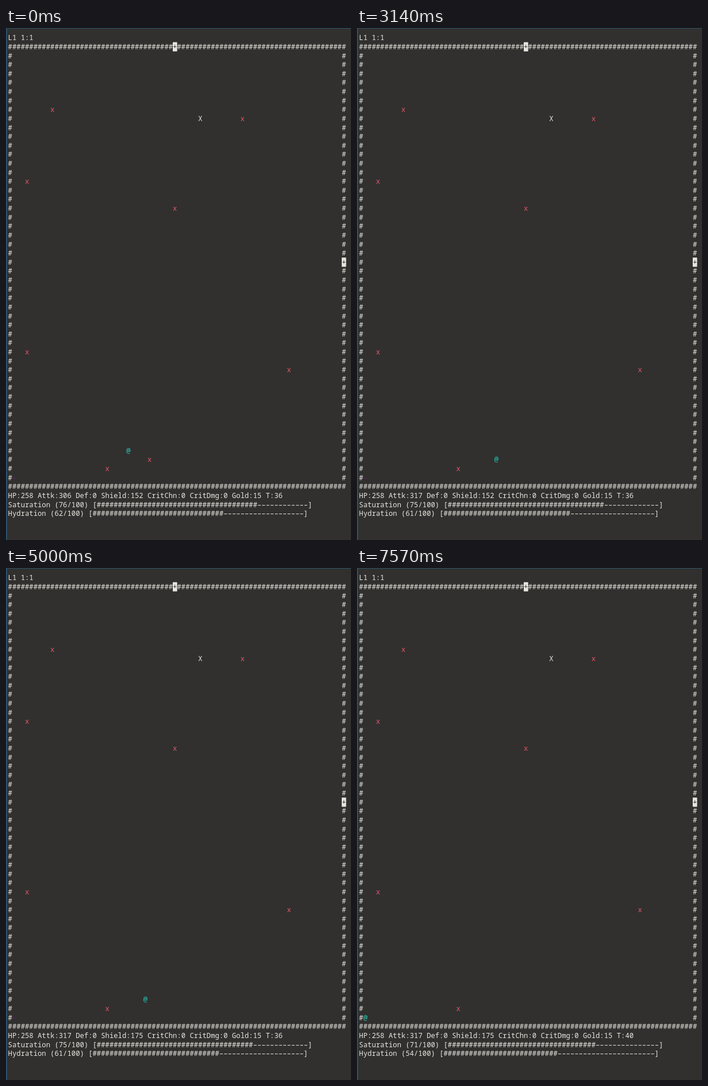
Write an HTML page with a canvas that moves like this. It is 600 px wide and 891 px high and loops after 8000 ms.

```html
<!DOCTYPE html>
<html lang="en">
<head>
<meta charset="utf-8">
<title>Terminal dungeon</title>
<style>
html, body { margin: 0; width: 100%; height: 100%; overflow: hidden; background: #31302e; }
canvas { display: block; }
</style>
</head>
<body>
<canvas id="stage" width="600" height="891"></canvas>
<script>
const ctx = document.getElementById('stage').getContext('2d');
const LOOP = 8000, COLS = 80, LEFT = 3.6, TOP = 9.2, CELL_W = 7.346, CELL_H = 15.62;
const BG = '#31302e', WHITE = '#e8e6e0', RED = '#e2566a', GREEN = '#4fb24b', CYAN = '#25cdb8', PURPLE = '#860a8c';
const DASH = '–';

// Monsters as [column, row]; the last one is fought.
const monsters = [[10, 8], [55, 9], [4, 16], [39, 19], [4, 35], [66, 37], [23, 48], [33, 47]];

const items = [
  { type: 'Weapon', level: 2, color: WHITE, wear: '99.917568', stats: ['Uses: 4', 'Calibration Level: 2', 'Enhancement: 5', 'Damage: 237'] },
  { type: 'Shield', level: 1, color: GREEN, wear: '99.940000', stats: ['Uses: 3', 'Calibration Level: 1', 'Enhancement: 2', 'Shield: 152'] },
  { type: 'Helmet', color: WHITE, wear: '100.000000', stats: ['Health: 31'] },
  { type: 'Helmet', color: GREEN, wear: '99.980000', stats: ['Uses: 1', 'Health: 49'] },
  { type: 'Shield', color: GREEN, wear: '100.000000', stats: ['Shield: 175'] }
];

// Value of the last [time, value] step that has been reached.
const stepAt = (t, steps) => steps.filter(s => s[0] <= t).pop()[1];

function put(col, row, text, color = WHITE, inverse = false) {
  const x = LEFT + col * CELL_W, y = TOP + row * CELL_H;
  if (inverse) {
    ctx.fillStyle = color;
    ctx.fillRect(x, y, text.length * CELL_W, CELL_H);
  }
  ctx.fillStyle = inverse ? BG : color;
  [...text].forEach((ch, i) => {
    if (ch !== ' ') ctx.fillText(ch, x + i * CELL_W, y + 12.1);
  });
}

function hero(t) {
  if (t >= 6290) {
    const steps = Math.floor((t - 6280) * 7 / 1000);
    return { col: Math.max(1, 27 - 4 * steps), row: stepAt(t, [[0, 47], [7430, 48], [7570, 49]]) };
  }
  return {
    col: stepAt(t, [[0, 28], [860, 29], [1000, 30], [1140, 32], [5570, 31]]),
    row: t < 570 ? 46 : 47
  };
}

// Moves made, counted from the end of the fight.
function moveCount(t, { col, row }) {
  if (t < 570) return -6;
  if (t < 1430) return col - 33;
  return 32 - col + row - 47;
}

function drawMap(t, { col, row }) {
  put(0, 0, 'L1 1:1');
  for (const y of [1, 50]) put(0, y, '#'.repeat(COLS));
  for (let y = 2; y < 50; y++) {
    put(0, y, '#');
    put(COLS - 1, y, '#');
  }
  for (const [x, y] of [[39, 1], [79, 25]]) {
    put(x, y, ' ', WHITE, true);
    put(x, y, '+', WHITE, true);
  }
  put(45, 9, 'X');
  monsters.slice(0, t < 2000 ? 8 : 7).forEach(([x, y]) => put(x, y, 'x', RED));
  if (row !== 49) put(1, 49, '-', PURPLE);
  put(col, row, '@', CYAN);
}

function drawDetails(row, item, equipped) {
  put(0, row, 'Name: Placeholder');
  put(0, row + 1, 'Rarity:');
  put(8, row + 1, item.color === GREEN ? 'Uncommon' : 'Common', item.color);
  put(0, row + 2, 'Type: ' + item.type);
  put(0, row + 3, 'Equipped: ' + equipped, equipped ? GREEN : RED);
  put(0, row + 4, `Durability: ${item.wear}%`);
  item.stats.forEach((line, i) => put(0, row + 5 + i, line));
}

function drawLoot() {
  put(0, 0, 'L1 1:1');
  put(0, 1, 'Press any key to keep and [r] to trash');
  drawDetails(2, items[4], false);
}

function drawInventory(t) {
  const selected = stepAt(t, [[0, 0], [3860, 1], [4140, 2], [4290, 3], [4430, 4]]);
  const worn = [0, 3, t < 4710 ? 1 : 4];
  put(0, 0, 'Inventory (1/1)');
  items.forEach(({ type, level, color }, i) => {
    const star = worn.includes(i) ? '*' : '', suffix = level ? ` [${level}]` : '';
    put(0, i + 1, `${star}[${type}] Placeholder${suffix}`, color, i === selected);
  });
  put(0, 35, DASH.repeat(COLS));
  drawDetails(36, items[selected], worn.includes(selected));
}

function drawBar(row, name, value) {
  const full = Math.floor(value / 2);
  put(0, row, `${name} (${value}/100) [${'#'.repeat(full)}${DASH.repeat(50 - full)}]`);
}

function drawStatus(t, moves) {
  const attack = t < 2000 ? 306 : 317;
  const shield = stepAt(t, [[0, 152], [1570, 71], [3140, 152], [4710, 175]]);
  const turn = 36 + Math.floor((moves + 7) / 10);
  put(0, 51, `HP:258 Attk:${attack} Def:0 Shield:${shield} CritChn:0 CritDmg:0 Gold:15 T:${turn}`);
  drawBar(52, 'Saturation', 75 - Math.floor(moves / 7));
  drawBar(53, 'Hydration', 61 - Math.floor((moves + 2) / 5));
}

function draw(t) {
  ctx.fillStyle = BG;
  ctx.fillRect(0, 0, 600, 891);
  ctx.fillStyle = '#2b506b';
  ctx.fillRect(0, 0, 2, 891);
  ctx.fillRect(0, 0, 600, 1);
  ctx.font = '12.243px "Noto Sans Mono", "DejaVu Sans Mono", monospace';

  const pos = hero(t);
  const screen = stepAt(t, [[0, 'map'], [2000, 'loot'], [3140, 'map'], [3570, 'bag'], [5000, 'map']]);
  if (screen === 'map') drawMap(t, pos);
  else if (screen === 'loot') drawLoot();
  else drawInventory(t);
  drawStatus(t, moveCount(t, pos));
}

const start = performance.now();
function tick() {
  draw((performance.now() - start) % LOOP);
  requestAnimationFrame(tick);
}
tick();
</script>
</body>
</html>
```
